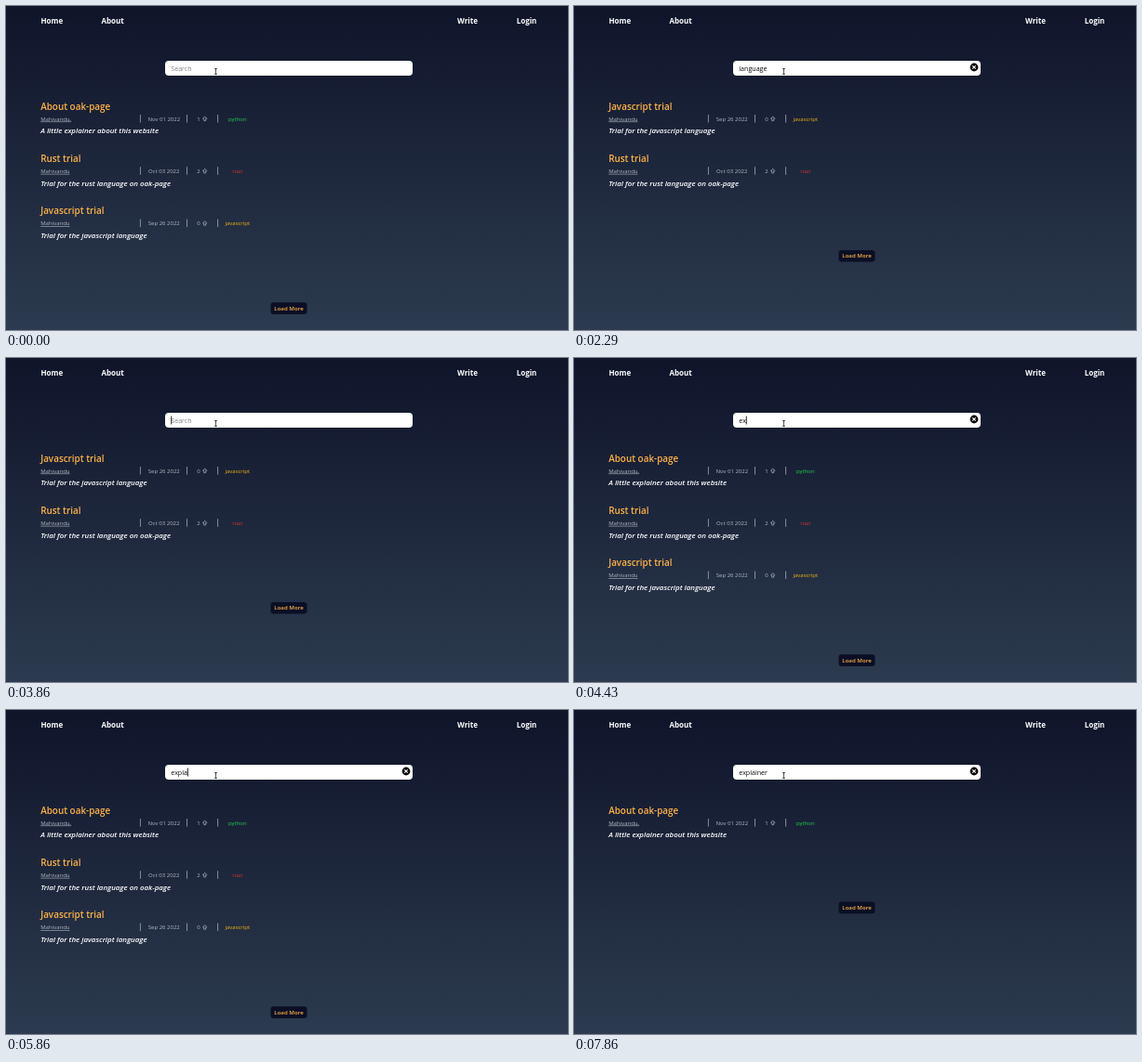
An HTML page that plays this animation: 604 px wide and 349 px high, repeating every 8 s.

```html
<!DOCTYPE html>
<html lang="en">
<head>
<meta charset="utf-8">
<title>Blog search</title>
<style>
  html, body { margin: 0; width: 100%; height: 100%; overflow: hidden; background: #0f1429; }
  svg { display: block; width: 100%; height: 100%; font-family: "Open Sans", "Noto Sans", sans-serif; }
  .nav { font-size: 8px; font-weight: 700; fill: #fff; }
  .query { font-size: 7.1px; fill: #08090c; }
  .hint { fill: #858585; }
  .title { font-size: 9.9px; font-weight: 600; fill: #ffb347; }
  .meta { font-size: 6px; fill: #b2b7c2; }
  .author { text-decoration: underline; }
  .summary { font-size: 7.9px; font-style: italic; font-weight: 600; fill: #fff; }
  .more { font-size: 6.1px; font-weight: 600; fill: #ffb347; }
  .mid { text-anchor: middle; }
  .line { fill: none; stroke: #a2a7b3; stroke-width: .8; }
</style>
</head>
<body>
<svg viewBox="0 0 604 349">
  <defs>
    <linearGradient id="sky" x2="0" y2="1">
      <stop stop-color="#0f1429"/>
      <stop offset="1" stop-color="#2c3b4f"/>
    </linearGradient>
  </defs>
  <rect width="604" height="349" fill="url(#sky)"/>

  <g class="nav">
    <text x="37.5" y="18.8">Home</text>
    <text x="102.5" y="18.8">About</text>
    <text x="485" y="18.8">Write</text>
    <text x="548.7" y="18.8">Login</text>
  </g>

  <rect x="171" y="59" width="266" height="16" rx="4" fill="#fff"/>
  <text id="query" class="query" x="177.3" y="70.3"></text>
  <path id="caret" d="M0 62.5V71.5" stroke="#111" stroke-width=".9"/>
  <g id="clear">
    <circle cx="430" cy="66" r="4.4" fill="#0a0a0a"/>
    <path d="M428.3 64.3l3.4 3.4m0-3.4l-3.4 3.4" stroke="#fff" stroke-width="1.1"/>
  </g>
  <path d="M224.1 67.5h2.8M225.5 67.5v6M224.1 73.5h2.8" fill="none" stroke="#222" stroke-width=".8"/>

  <g id="posts"></g>
  <g id="more">
    <rect x="284.5" y="94" width="39" height="12.7" rx="3" fill="#0a0f24"/>
    <text class="more mid" x="304" y="102.6">Load More</text>
  </g>
</svg>

<script>
const DURATION = 8000;
const ROW = 56.3;
const $ = id => document.getElementById(id);

const posts = {
  about: ["About oak-page", "Mahivandu,", "Nov 01 2022", 1, "python", "#22d34f", "A little explainer about this website"],
  rust: ["Rust trial", "Mahivandu", "Oct 03 2022", 2, "rust", "#d93434", "Trial for the rust language on oak-page"],
  script: ["Javascript trial", "Mahivandu", "Sep 26 2022", 0, "javascript", "#f7b316", "Trial for the javascript language"]
};

// [start time, value]
const queries = [
  [0, ""], [150, "l"], [290, "la"], [860, "lan"], [1000, "lang"], [1150, "langu"],
  [1290, "langua"], [1430, "languag"], [1720, "language"],
  [3290, "langua"], [3430, "lang"], [3570, "l"], [3860, ""],
  [4290, "e"], [4430, "ex"], [4570, "exp"], [5720, "expl"], [5860, "expla"],
  [6000, "explai"], [6150, "explain"], [6290, "explaine"], [6430, "explainer"]
];
const carets = [
  [0, false], [150, true], [2290, false], [2860, true], [5150, false],
  [5430, true], [6720, false], [7290, true], [7860, false]
];
const results = [
  [0, ["about", "rust", "script"]], [1860, ["script", "rust"]],
  [4000, ["about", "rust", "script"]], [7430, ["about"]]
];

const valueAt = (track, time) => track.findLast(([start]) => start <= time)[1];

function postMarkup(key, index) {
  const [title, author, date, votes, tag, color, summary] = posts[key];
  return `<g transform="translate(0 ${index * ROW})">
    <text class="title" x="37.2" y="111.8">${title}</text>
    <text class="meta author" x="37.2" y="123.5">${author}</text>
    <path class="line" d="M144.4 117v8.5M194.5 117v8.5M227.6 117v8.5"/>
    <text class="meta mid" x="169.8" y="123.5">${date}</text>
    <text class="meta" x="205.2" y="123.5">${votes}</text>
    <path class="line" d="M213.7 119l2.2 2.4h-1.2v2.2h-2v-2.2h-1.2z"/>
    <text class="meta mid" x="248.8" y="123.5" style="fill:${color}">${tag}</text>
    <text class="summary" x="37.2" y="137.4">${summary}</text>
  </g>`;
}

function show(element, visible) {
  element.setAttribute("visibility", visible ? "visible" : "hidden");
}

let shown;
function render(now) {
  const time = now % DURATION;
  const text = valueAt(queries, time);
  const list = valueAt(results, time);

  const query = $("query");
  query.textContent = text || "Search";
  query.classList.toggle("hint", !text);
  show($("clear"), text);
  show($("caret"), valueAt(carets, time));
  const width = text ? query.getComputedTextLength() : 0;
  $("caret").setAttribute("transform", `translate(${177.7 + width} 0)`);

  if (list !== shown) {
    shown = list;
    $("posts").innerHTML = list.map(postMarkup).join("");
    $("more").setAttribute("transform", `translate(0 ${ROW * (list.length + 1)})`);
  }
  requestAnimationFrame(render);
}
render(0);
</script>
</body>
</html>
```
